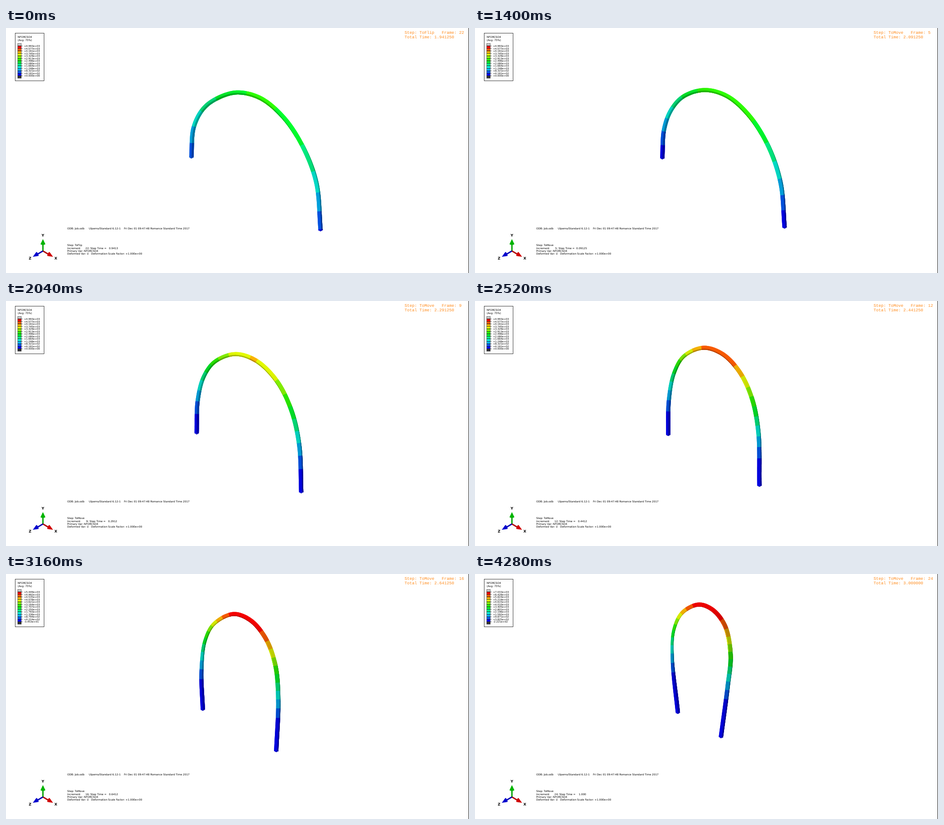
Recreate the animation shown at these times as an HTML page with a canvas. Size 1028x545 px, loop 7360 ms.

```html
<!DOCTYPE html>
<html lang="en">
<head>
<meta charset="utf-8">
<title>Beam flip</title>
<style>
  html, body { margin: 0; width: 100%; height: 100%; overflow: hidden; background: #fff; }
  canvas, svg { position: absolute; left: 0; top: 0; width: 1028px; height: 545px; }
  text { font: 5.75px "DejaVu Sans", sans-serif; white-space: pre; text-rendering: geometricPrecision; }
  .head { font: 9.17px "Liberation Mono", monospace; fill: #ff8c1e; }
  .scale { font-size: 5.5px; }
  .axis { font-size: 8px; font-weight: bold; text-anchor: middle; }
</style>
</head>
<body>
<canvas id="beam" width="1028" height="545"></canvas>
<svg viewBox="0 0 1028 545">
  <path d="M1027.5 0V545" stroke="#111"/>
  <rect x="20.5" y="11.5" width="64" height="106" fill="none" stroke="#222" stroke-width=".9"/>
  <text x="26" y="22.2">NFORCSO4</text>
  <text x="26" y="29.2">(Avg: 75%)</text>
  <g id="legend"></g>

  <text class="head" x="885" y="12.6" id="step"></text>
  <text class="head" x="885" y="23.2" id="total"></text>

  <text x="136" y="448">ODB: Job.odb</text>
  <text x="184" y="448">Ulpemo/Standard 6.12-1</text>
  <text x="262" y="448">Fri Dec 01 09:47:48 Romance Standard Time 2017</text>
  <text x="136" y="485.4" id="name"></text>
  <text x="136" y="491.8" id="inc"></text>
  <text x="136" y="498">Primary Var: NFORCSO4</text>
  <text x="136" y="504.1">Deformed Var: U   Deformation Scale Factor: +1.000e+00</text>

  <g stroke-width="3">
    <path d="M82 496V481" stroke="#00a000"/>
    <path d="M82 496L93 502.5" stroke="#b00000"/>
    <path d="M82 496L71 502.5" stroke="#0000b0"/>
  </g>
  <path d="M82 469.5L87.5 481Q82 484 76.5 481Z" fill="#00b400"/>
  <path d="M104.5 509L91.5 507Q92 500.5 96.5 498Z" fill="#d00000"/>
  <path d="M59.5 509L72.5 507Q72 500.5 67.5 498Z" fill="#0000cd"/>
  <text class="axis" x="82" y="464.3">Y</text>
  <text class="axis" x="110.5" y="514.6">X</text>
  <text class="axis" x="53.5" y="514.6">Z</text>
</svg>
<script>
const $ = id => document.getElementById(id);
const ctx = $('beam').getContext('2d');
const LOOP = 7360, HOLD = 1080, TICK = 160, TICKS = 21, SLICES = 320;

const BANDS = [[0,0,255], [0,93,255], [0,185,255], [0,255,231], [0,255,139], [0,255,46],
  [46,255,0], [139,255,0], [231,255,0], [255,185,0], [255,93,0], [255,0,0]];

// Centre line (x, y pairs) and quadratic of band level against height above the chord
const FLIP = {t: 0, lo: 0, hi: 4992.88, q: [1.02, .0273, -1.8e-5],
  p: [411.5,288, 416.5,222, 436,182, 463,159.5, 511,143.5, 564,155.5, 616,198.5, 658.5,263, 689,344, 698.5,450]};
const POSES = [
  {t: 0, lo: 0, hi: 4992.88, q: [.037, .0342, -3.49e-5],
    p: [412.5,288, 417.5,228, 434,190, 462,160.5, 508,147.5, 558,158.5, 606,196.5, 654,260, 690,346, 702,452]},
  {t: .19125, lo: 0, hi: 4992.88, q: [-.203, .0288, 3.14e-5],
    p: [419.5,292, 422.5,222, 437,174, 463,143.5, 510,127.5, 560,143, 611,192, 647,264, 666,343, 671.5,435]},
  {t: .44125, lo: 0, hi: 4992.88, q: [-.95, .0302, 6.96e-5],
    p: [429,298, 430.5,220, 442,160, 464,122.5, 507,104, 549,117.5, 587,157, 614,214, 629,290, 631.5,411]},
  {t: .64125, lo: -34.53, hi: 5449, q: [-1.698, .0324, 7.95e-5],
    p: [437,302, 434,215, 442,148, 462,110.5, 505,89, 543,103, 577,144, 598,203, 604.5,280, 600,394]},
  {t: .84125, lo: -128.8, hi: 6331.2, q: [-2.374, .0364, 6.52e-5],
    p: [444,306, 437.5,195, 443,134, 462,97, 499,76, 534,88, 565,128, 581,190, 579,270, 570,377]},
  {t: 1, lo: -222.1, hi: 7033, q: [-2.35, .0318, 7.74e-5],
    p: [450.5,309, 438,185, 441.5,124, 460,86, 496,68, 527,79, 555,115, 567.5,180, 561,250, 546,363]}
];

const mix = (a, b, u) => a + (b - a) * u;

// Piecewise linear curve through [x, y] knots
function ramp(x, knots) {
  let i = 1;
  while (i < knots.length - 1 && x > knots[i][0]) i++;
  const [a, b] = [knots[i - 1], knots[i]];
  return mix(a[1], b[1], Math.min(1, Math.max(0, (x - a[0]) / (b[0] - a[0]))));
}

// Level polynomial in force units
const force = ({q, lo, hi}) => q.map((c, i) => c * (hi - lo) / 12 + (i ? 0 : lo));

function poseAt(t) {
  let i = 1;
  while (i < POSES.length - 1 && t > POSES[i].t) i++;
  const a = POSES[i - 1], b = POSES[i], u = (t - a.t) / (b.t - a.t);
  const fb = force(b);
  return {
    t,
    p: a.p.map((v, j) => mix(v, b.p[j], u)),
    f: force(a).map((v, j) => mix(v, fb[j], u)),
    lo: ramp(t, [[.54125, 0], ...POSES.slice(3).map(k => [k.t, k.lo])]),
    hi: ramp(t, [[.49125, 4992.88], [.54125, 5008], ...POSES.slice(3).map(k => [k.t, k.hi])])
  };
}

// Centripetal spline sampled evenly in its parameter
function spline(flat) {
  const pts = [];
  for (let i = 0; i < flat.length; i += 2) pts.push([flat[i], flat[i + 1]]);
  const n = pts.length, mirror = (a, b) => [2 * a[0] - b[0], 2 * a[1] - b[1]];
  const all = [mirror(pts[0], pts[1]), ...pts, mirror(pts[n - 1], pts[n - 2])];
  const knots = [0];
  for (let i = 1; i < all.length; i++)
    knots.push(knots[i - 1] + Math.sqrt(Math.hypot(all[i][0] - all[i - 1][0], all[i][1] - all[i - 1][1])));
  const out = [];
  for (let s = 0; s <= SLICES; s++) {
    const x = mix(knots[1], knots[n], s / SLICES);
    let i = 1;
    while (i < n - 1 && x > knots[i + 1]) i++;
    let row = all.slice(i - 1, i + 3);
    const k = knots.slice(i - 1, i + 3);
    const blend = (a, b, ka, kb) => a.map((v, j) => mix(v, b[j], (x - ka) / (kb - ka)));
    row = [0, 1, 2].map(j => blend(row[j], row[j + 1], k[j], k[j + 1]));
    row = [0, 1].map(j => blend(row[j], row[j + 1], k[j], k[j + 2]));
    out.push(blend(row[0], row[1], k[1], k[2]));
  }
  return out;
}

const tint = (c, k) => `rgb(${c.map(v => Math.round(v * k))})`;

function fill(color, ...pts) {
  ctx.fillStyle = color;
  ctx.beginPath();
  pts.forEach(p => ctx.lineTo(p[0], p[1]));
  ctx.fill();
}

function drawBeam({t, p, f, lo, hi}) {
  const line = spline(p), last = SLICES;
  const [x0, y0] = line[0], [x1, y1] = line[last];
  const arc = [0];
  for (let i = 1; i <= last; i++)
    arc.push(arc[i - 1] + Math.hypot(line[i][0] - line[i - 1][0], line[i][1] - line[i - 1][1]));

  const ribs = line.map(([x, y], i) => {
    const a = line[Math.max(0, i - 1)], b = line[Math.min(last, i + 1)];
    const len = Math.hypot(b[0] - a[0], b[1] - a[1]);
    const dx = (b[0] - a[0]) / len, dy = (b[1] - a[1]) / len;
    const s = arc[i] / arc[last];
    const half = 4.8 - (.2 + 1.4 * t) * Math.exp(-(((s - .27) / .13) ** 2));
    const u = (x - x0) / (x1 - x0);
    const d = y0 + (y1 - y0) * u - y + 5 * (1 - 2 * Math.min(1, Math.max(0, u)));
    const level = (f[0] + f[1] * d + f[2] * d * d - lo) / (hi - lo) * 12;
    return {
      s, dx, dy,
      color: BANDS[Math.min(11, Math.max(0, Math.floor(level)))],
      // v runs from -1 on the outer edge to 1 on the inner edge
      at: v => [x - dy * half * v, y + dx * half * v]
    };
  });

  const strip = (i, from, to, shade) => {
    const a = ribs[i], b = ribs[Math.min(last, i + 2)];
    fill(tint(a.color, shade), a.at(from), b.at(from), b.at(to), a.at(to));
  };
  ctx.clearRect(0, 0, 1028, 545);
  const cap = (r, dir) => {
    const tip = r.at(0);
    fill(tint(r.color, .75), r.at(-1), [tip[0] + r.dx * dir * 2.5, tip[1] + r.dy * dir * 2.5], r.at(1));
  };
  cap(ribs[0], -1);
  cap(ribs[last], 1);
  for (let i = 0; i < last; i++) {
    const {s} = ribs[i];
    const lit = ramp(s, [[0, .87], [.22, .82 - .08 * t], [.38, 1 - .06 * t], [.5, 1 - .08 * t],
      [.6, 1 - .28 * t], [.78, .84 - .12 * t], [1, .88]]);
    const inner = ramp(s, [[0, .5], [.2, .42 - .15 * t], [.36, .4 - .3 * t], [.5, .24 - .2 * t], [.64, 0]]);
    const outer = ramp(s, [[.64, 0], [.85, .2], [1, .3]]);
    strip(i, -1, 1, lit);
    if (inner > .02) strip(i, 1 - 2 * inner, 1, lit * .7);
    if (outer > .02) strip(i, -1, 2 * outer - 1, lit * .62);
    if (t > .4 && s > .54 && s < .68) strip(i, .74, 1, .95);
  }
}

const labels = [];
function buildLegend() {
  const add = (tag, attrs) => {
    const el = document.createElementNS('http://www.w3.org/2000/svg', tag);
    for (const k in attrs) el.setAttribute(k, attrs[k]);
    return $('legend').appendChild(el);
  };
  const pitch = 5.53, top = 34.4;
  const swatches = ['#c8c8c8', ...BANDS.map(c => tint(c, 1)).reverse(), '#333'];
  swatches.forEach((color, i) => add('rect', {x: 26, y: top + i * pitch, width: 8, height: pitch,
    fill: color, stroke: '#222', 'stroke-width': .6}));
  for (let i = 0; i < 13; i++) {
    const y = top + (i + 1) * pitch;
    add('path', {d: `M26 ${y}H37`, stroke: '#222', 'stroke-width': .7});
    labels.push(add('text', {x: 40, y: y + 2.1, class: 'scale'}));
  }
}

function sci(v) {
  const [m, e] = Math.abs(v).toExponential(3).split('e+');
  return `${v < 0 ? '-' : '+'}${m}e+${e.padStart(2, '0')}`;
}

// Time of an increment: steps grow by half until they reach 0.05
const stepTime = n => n === 24 ? 1 : n === 4 ? .0575 : n === 5 ? .09125 : .14125 + .05 * (n - 6);

function show(k) {
  const flip = k < 2;
  const n = k === 0 ? 22 : k === 1 || k === TICKS ? 24 : k + 2;
  const t = stepTime(n), name = flip ? 'ToFlip' : 'ToMove';
  const pose = k === 0 ? {...FLIP, f: force(FLIP)} : poseAt(flip ? 0 : t);
  drawBeam(pose);
  const shown = (t + (t > .7 ? 1e-6 : -1e-6)).toPrecision(4);
  $('step').textContent = `Step: ${name}   Frame: ${n}`;
  $('total').textContent = `Total Time: ${(t + (flip ? 1 : 2)).toFixed(6)}`;
  $('name').textContent = `Step: ${name}`;
  $('inc').textContent = `Increment${String(n).padStart(8)}: Step Time =${shown.padStart(9)}`;
  labels.forEach((el, i) => el.textContent = sci(mix(pose.hi, pose.lo, i / 12)));
}

buildLegend();
let shownTick = -1;
const start = performance.now();
function tick() {
  const ms = (performance.now() - start) % LOOP;
  const k = ms < HOLD ? 0 : Math.min(TICKS, Math.floor((ms - HOLD) / TICK) + 1);
  if (k !== shownTick) show(shownTick = k);
  requestAnimationFrame(tick);
}
tick();
</script>
</body>
</html>
```
